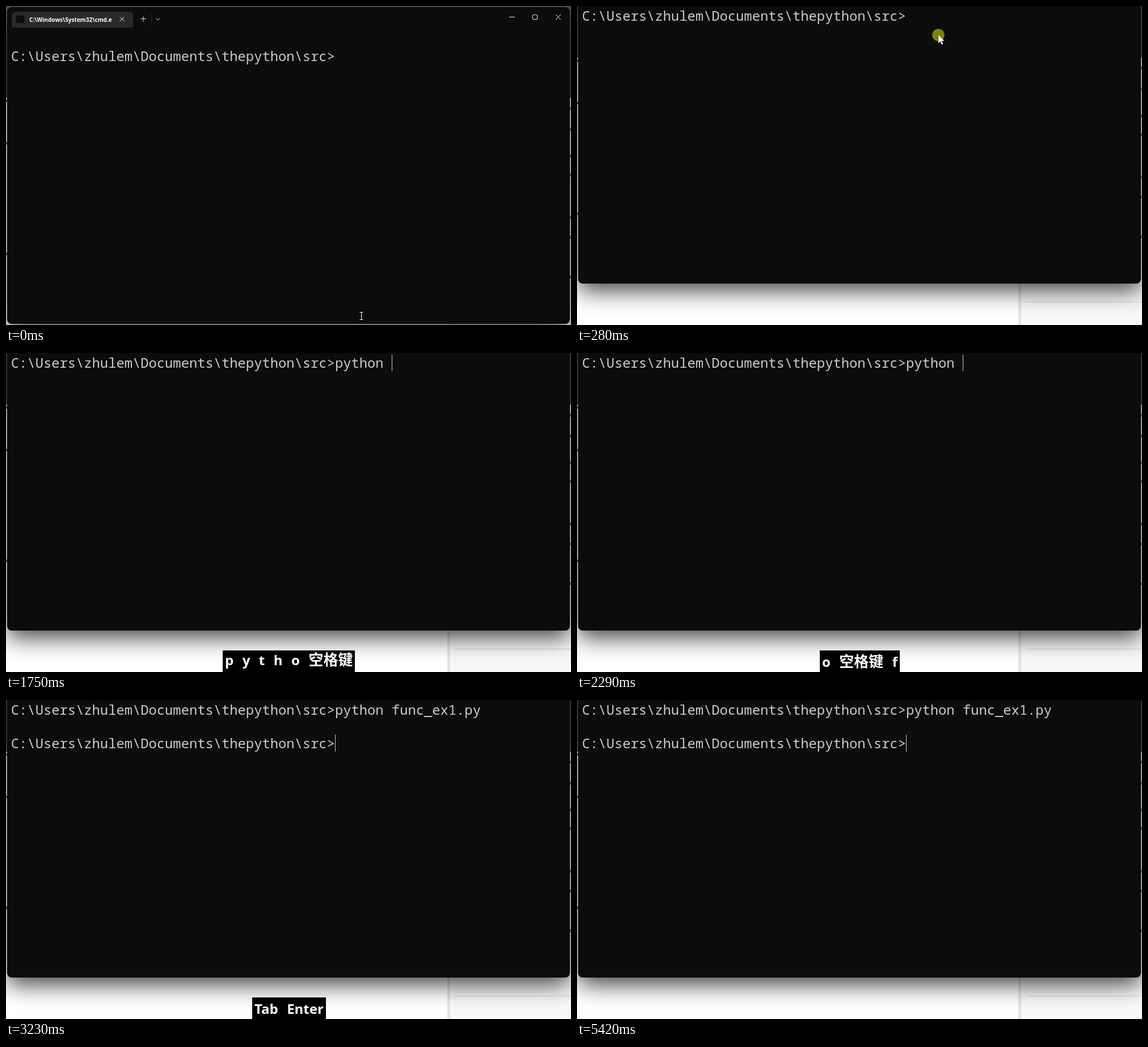
Write an HTML page with a canvas that moves like this. It is 996x562 px and loops after 5820 ms.

```html
<!DOCTYPE html>
<html lang="en">
<head>
<meta charset="utf-8">
<title>Running a script in the terminal</title>
<style>
  html, body { margin: 0; width: 100%; height: 100%; overflow: hidden; background: #fff; }
  canvas { display: block; }
</style>
</head>
<body>
<canvas id="stage" width="996" height="562"></canvas>
<script>
const ctx = document.getElementById('stage').getContext('2d');
const LOOP = 5820;
const SCROLL = 71;
const CELL = 14.28;
const LEFT = 8.8;
const PROMPT = 'C:\\Users\\zhulem\\Documents\\thepython\\src>';
const MONO = '23.8px "Noto Sans Mono", "DejaVu Sans Mono", monospace';
const KEY_FONT = 'bold 24px "Noto Sans", "Open Sans", sans-serif';
const CJK_FONT = 'bold 26px "Noto Sans CJK SC", "Noto Sans CJK", sans-serif';

// [time, command typed so far]
const typing = [
  [0, ''], [1020, 'p'], [1140, 'py'], [1350, 'pyth'], [1490, 'pytho'],
  [1550, 'python'], [1750, 'python '], [2350, 'python f'],
  [2420, 'python fu'], [2690, 'python func_ex1.py']
];

// [label, shown from, shown until]
const keys = [
  ['p', 1020, 1950], ['y', 1140, 2020], ['t', 1350, 2290], ['h', 1350, 2290],
  ['o', 1420, 2490], ['空格键', 1690, 2620], ['f', 2290, 3160],
  ['u', 2350, 3160], ['Tab', 2620, 3490], ['Enter', 3160, 4090]
];

const caretTimes = [[350, 870], [1020, 3760], [4300, 4830], [5420, LOOP]];
const within = (t, [from, to]) => t >= from && t < to;

function rect(x, y, w, h, color) {
  ctx.fillStyle = color;
  ctx.fillRect(x, y, w, h);
}

function roundRect(x, y, w, h, radius, color) {
  ctx.fillStyle = color;
  ctx.beginPath();
  ctx.roundRect(x, y, w, h, radius);
  ctx.fill();
}

function text(string, x, y, font, color) {
  ctx.font = font;
  ctx.fillStyle = color;
  ctx.fillText(string, x, y);
}

function lines(color, ...paths) {
  ctx.strokeStyle = color;
  ctx.lineWidth = 1;
  ctx.beginPath();
  for (const [start, ...rest] of paths) {
    ctx.moveTo(...start);
    rest.forEach(point => ctx.lineTo(...point));
  }
  ctx.stroke();
}

function cross(x, y, r) {
  lines('#eee', [[x - r, y - r], [x + r, y + r]], [[x - r, y + r], [x + r, y - r]]);
}

function drawDesktop() {
  rect(0, 0, 996, 640, '#fff');
  rect(784, 162, 212, 480, '#f8f8f8');
  rect(778, 162, 5, 480, '#e4e4e4');
  rect(791, 592, 205, 1, '#d4d4d4');
  rect(0, 0, 996, 162, '#555');
  [165, 240, 435].forEach(y => rect(0, y, 2, 4, '#555'));
  [178, 215, 262, 295, 370, 405, 475].forEach(y => rect(994, y, 2, 5, '#777'));
}

function drawWindow() {
  ctx.save();
  ctx.shadowColor = 'rgba(0,0,0,.75)';
  ctx.shadowBlur = 40;
  ctx.shadowOffsetY = 12;
  roundRect(2, 2, 992, 558, 8, '#0c0c0c');
  ctx.restore();

  roundRect(10, 10, 214, 28, [7, 7, 0, 0], '#292929');
  rect(18, 17, 14, 13, '#0c0c0c');
  text('C:\\Windows\\System32\\cmd.e', 41, 27.5,
       'bold 10.1px "Noto Sans", "Open Sans", sans-serif', '#fff');
  cross(204.5, 23, 4);
  lines('#ddd', [[237, 22.5], [247, 22.5]], [[242, 18], [242, 28]]);
  lines('#222', [[256.5, 13], [256.5, 34]]);
  lines('#ddd', [[264.5, 21.5], [268, 25], [271.5, 21.5]]);
  lines('#eee', [[887, 19.5], [897, 19.5]]);
  ctx.beginPath();
  ctx.roundRect(928.5, 15.5, 8, 8, 1.5);
  ctx.stroke();
  cross(973.5, 19.5, 4.5);
}

function drawTerminal(t) {
  const command = typing.findLast(([start]) => t >= start)[1];
  const done = t >= 3230;
  const baseline = SCROLL + 26;
  text(PROMPT + command, LEFT, baseline, MONO, '#ccc');
  if (done) text(PROMPT, LEFT, baseline + 59, MONO, '#ccc');

  if (caretTimes.some(span => within(t, span))) {
    const column = PROMPT.length + (done ? 0 : command.length);
    rect(Math.floor(LEFT + column * CELL + .1), SCROLL + (done ? 61 : 3), 1, done ? 30 : 29, '#ccc');
  }
}

function drawPointer(t, step) {
  if (t >= 1020) return;
  if (step < 4) {
    const x = 626.5 + step * 2.6;
    const y = 546 - step * 122;
    lines('#fff', [[x, y - 6], [x, y + 6]],
      [[x - 3, y - 6.5], [x + 3, y - 6.5]], [[x - 3, y + 6.5], [x + 3, y + 6.5]]);
    return;
  }
  if (t < 350) {
    ctx.fillStyle = '#80800a';
    ctx.beginPath();
    ctx.arc(637, 51, 10.8, 0, 7);
    ctx.fill();
  }
  ctx.fillStyle = '#fff';
  ctx.strokeStyle = '#000';
  ctx.lineWidth = 1;
  ctx.stroke(arrow);
  ctx.fill(arrow);
}
const arrow = new Path2D('M637 50V65.5L640.5 62.3L643 68L645.2 67L642.8 61.5H647.5Z');

function drawKeys(t) {
  const shown = keys.filter(([, from, to]) => within(t, [from, to])).map(([label]) => label);
  if (!shown.length) return;
  const gap = 15.5, pad = 4;
  const fontOf = label => label > '一' ? CJK_FONT : KEY_FONT;
  const widths = shown.map(label => {
    ctx.font = fontOf(label);
    return ctx.measureText(label).width;
  });
  const total = widths.reduce((sum, w) => sum + w + gap, 2 * pad - gap);
  const left = Math.round(498.5 - total / 2);
  rect(left, 524, Math.round(total), 38, '#000');

  // Labels are centred on their ink, so descenders lift the baseline.
  const baseline = shown.some(label => /[py]/.test(label)) ? 550 : 553;
  let x = left + pad;
  shown.forEach((label, i) => {
    text(label, x, baseline, fontOf(label), '#fff');
    x += widths[i] + gap;
  });
}

function frame() {
  const t = performance.now() % LOOP;
  const step = Math.min(4, Math.floor(t / 70));
  ctx.save();
  ctx.translate(0, -Math.round(SCROLL * Math.min(1, step / 3)));
  drawDesktop();
  drawWindow();
  drawTerminal(t);
  ctx.restore();
  drawPointer(t, step);
  drawKeys(t);
  requestAnimationFrame(frame);
}
frame();
</script>
</body>
</html>
```
